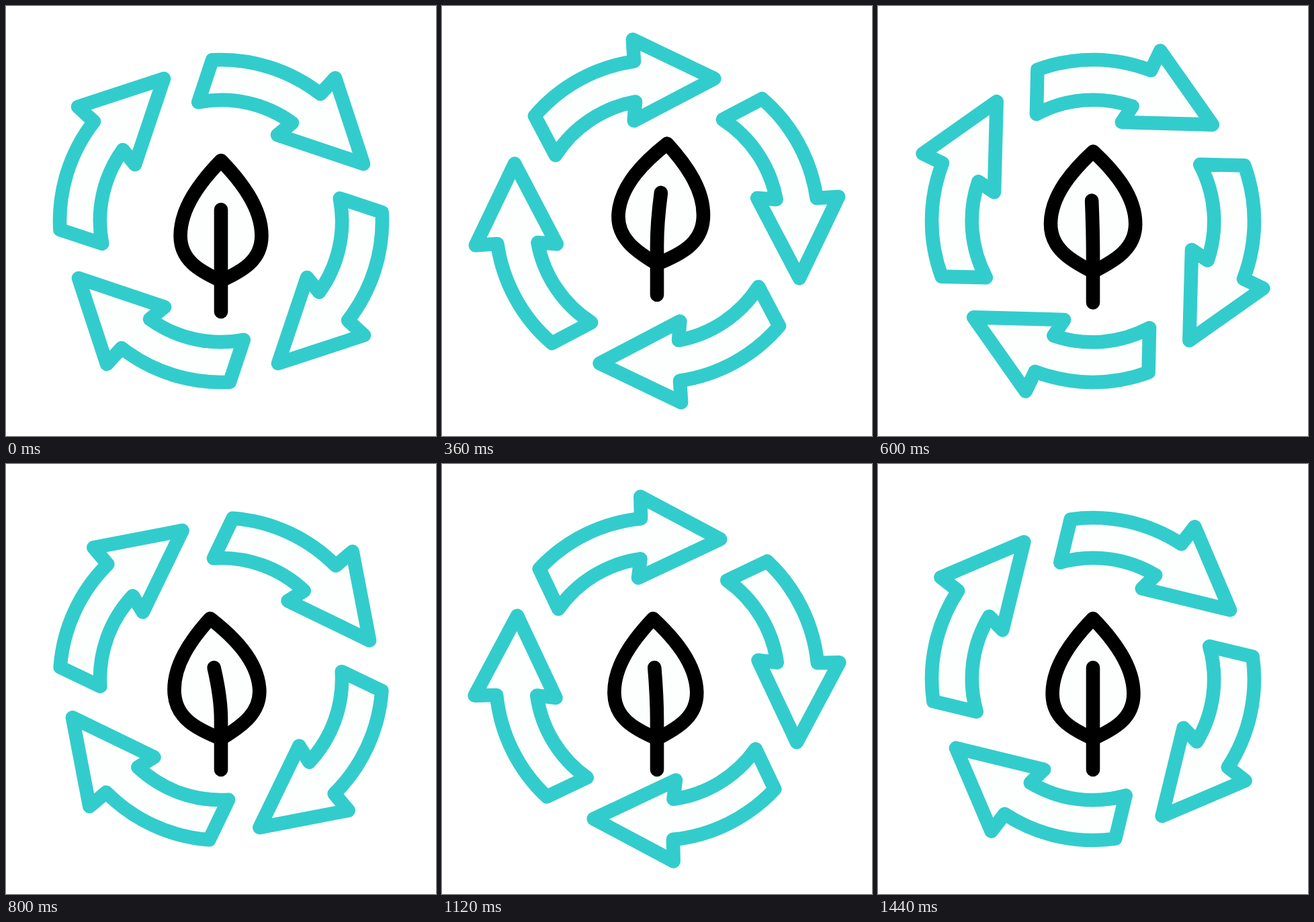
Recreate the animation shown at these times as an HTML page. Size 640 px wide and 640 px high, loop 1.48 s.

```html
<!DOCTYPE html>
<html lang="en">
<head>
<meta charset="utf-8">
<title>Recycling leaf</title>
<style>
  html, body { margin: 0; width: 100%; height: 100%; overflow: hidden; background: #fff; }
  svg { display: block; width: 100%; height: 100%; }
  path { fill: #fdfefe; stroke-width: 20.6; stroke-linecap: round; stroke-linejoin: round; }
  #ring { stroke: #3cc; }
  #plant { stroke: #000; }
  #stem { fill: none; }
</style>
</head>
<body>
<svg viewBox="-320 -320 640 640">
  <defs>
    <path id="arrow" d="M-13-239.6A240 240 0 0 1 148-189L170-213L212-85L84-128L106-146A180 180 0 0 0-33.8-176.8Z"/>
  </defs>
  <g id="ring">
    <use href="#arrow"/>
    <use href="#arrow" transform="rotate(90)"/>
    <use href="#arrow" transform="rotate(180)"/>
    <use href="#arrow" transform="rotate(270)"/>
  </g>
  <g id="plant">
    <path id="leaf"/>
    <path id="stem"/>
  </g>
</svg>
<script>
const LOOP = 1480, STEP = 40;
const TIP = -90, BASE = 89, HALF = 60.4;
const [ring, plant, leaf, stem] = ['ring', 'plant', 'leaf', 'stem'].map(id => document.getElementById(id));

// The plant hops up leaning right, lands leaning left, then settles.
const poses = [
  { at: 80, lean: 0, swell: 0, lift: 0 },
  { at: 400, lean: 1, swell: 1, lift: -26.2 },
  { at: 808, lean: -1.03, swell: 1, lift: 0 },
  { at: 1330, lean: 0, swell: 0, lift: 0 }
];

const smooth = x => x * x * (3 - 2 * x);
const clamp = x => Math.min(1, Math.max(0, x));

function poseAt(t) {
  const i = Math.max(1, poses.findIndex((p, n) => p.at > t || n === poses.length - 1));
  const a = poses[i - 1], b = poses[i];
  const k = smooth(clamp((t - a.at) / (b.at - a.at)));
  const mix = key => a[key] + (b[key] - a[key]) * k;
  return { lean: mix('lean'), swell: mix('swell'), lift: mix('lift') };
}

function leafPath({ lean, swell }) {
  // Shear with height, tilt with the lean, and bulge sideways.
  const bend = (x, y) => {
    const h = (BASE - y) / (BASE - TIP), u = x / HALF;
    return [x + 15.8 * lean * h + 2.7 * swell * u, y + 5 * lean * u - 4 * swell * Math.abs(u)];
  };
  const side = s => `M${bend(0, TIP)}C` + [
    bend(s * 30, -59), bend(s * HALF, -20), bend(s * HALF, 22),
    bend(s * HALF, 58), bend(s * 33, 74), bend(0, BASE)
  ];
  return side(-1) + side(1);
}

function stemPath({ lean, swell }) {
  const x = 8.2 * lean - 2 * swell;
  return `M0 135V61C0 36 ${0.4 * x} 10 ${x} -17`;
}

function draw(t) {
  const pose = poseAt(t);
  ring.setAttribute('transform', `rotate(${180 * t / LOOP})`);
  plant.setAttribute('transform', `translate(0 ${pose.lift})`);
  leaf.setAttribute('d', leafPath(pose));
  stem.setAttribute('d', stemPath(pose));
}

let start;
function tick(now) {
  start ??= now;
  // Small bias keeps the 25 fps stepping stable on its boundaries.
  draw(Math.floor((now - start + 4) / STEP) * STEP % LOOP);
  requestAnimationFrame(tick);
}
draw(0);
requestAnimationFrame(tick);
</script>
</body>
</html>
```
